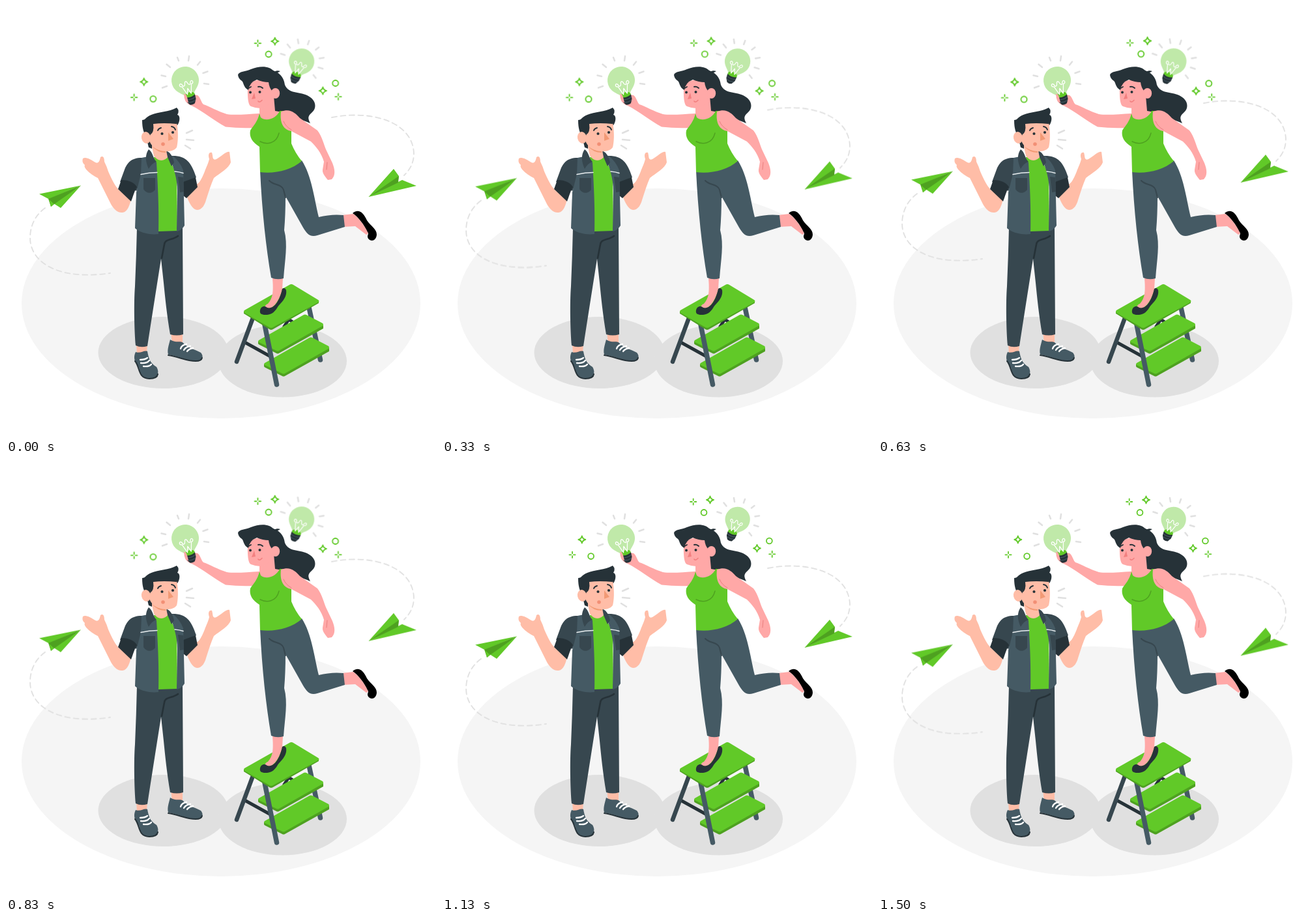
An HTML page that plays this animation: 660x660 px, repeating every 1540 ms.

```html
<!DOCTYPE html>
<html lang="en">
<head>
<meta charset="utf-8">
<title>Bright ideas</title>
<style>
  html, body { margin: 0; width: 100%; height: 100%; overflow: hidden; background: #fff; }
  svg { display: block; width: 100%; height: 100%; }
  .line { fill: none; stroke-linecap: round; stroke-linejoin: round; }
  .ray { stroke: #e0e0e0; stroke-width: 2.5; }
  .trail { stroke: #e0e0e0; stroke-width: 1.8; stroke-dasharray: 8 5.5; }
  .green { fill: #61c928; }
  .leaf { fill: #4ea120; }
  .ink { fill: #263238; }
  .navy { fill: #37474f; }
  .slate { fill: #455a64; }
  .rose { fill: #ffa8a7; }
  .peach { fill: #ffbda7; }
  .float { animation: float 1.54s linear -40ms infinite; }
  .beat { animation: beat 1.54s linear -40ms infinite; }
  #sparks { transform-origin: 355.5px 96.5px; }
  #idea { transform-origin: 455px 85px; }
  @keyframes float {
    0%, 100% { transform: translateY(1.4px); }
    49.35% { transform: translateY(-25px); }
  }
  @keyframes beat {
    0%, .5%, 29.5%, 40.3%, 58.5%, 100% { transform: scale(1); }
    10.4%, 49.4% { transform: scale(1.1); }
  }
</style>
</head>
<body>
<svg viewBox="0 0 660 660">
  <defs>
    <g id="bulb">
      <path fill="#c0e9a9" d="M-7 24C-9 18-21 14-21 0A21 21 0 0 1 21 0C21 14 9 18 7 24Z"/>
      <path class="green" d="M-8 23.500C-7 18 7 18 8 23.500L7.500 28H-7.500Z"/>
      <path class="line" stroke="#fff" stroke-width="1.300" d="M-3 22L-7.500 8C-12 8-11 2-8 3.500C-5 6-7 9-4 8C-1 7-3 2 0 2C3 2 1 7 4 8C7 9 5 6 8 3.500C11 2 12 8 7.500 8L3 22M-3 22L0 13L3 22"/>
      <path class="ink" d="M-8 25Q0 29 8 25L7.500 32L4 38Q0 40-4 38L-7.500 32Z"/>
      <path class="line" stroke="#455a64" stroke-width="1" d="M-7 29Q0 32 7 29M-6 33.500Q0 36 6 33.500"/>
    </g>
    <path id="plus" class="line" stroke="#61c928" stroke-width="1.800" d="M0-4.600V-1.900M0 1.900V4.600M-4.600 0H-1.900M1.900 0H4.600"/>
    <path id="star" class="line" stroke="#61c928" stroke-width="1.800" d="M0-5.500Q1-1 5.500 0Q1 1 0 5.500Q-1 1-5.500 0Q-1-1 0-5.500Z"/>
    <circle id="ring" class="line" stroke="#61c928" stroke-width="1.800" r="4.400"/>
    <g id="step">
      <path class="leaf" d="M0 0V3Q0 4 2 5L28 18Q30 19 32 18L100 -20V-25Z"/>
      <path class="green" d="M1 -2L70 -41Q72 -42 74 -41L99 -28Q101 -26 99 -24L32 14Q30 15 28 14L1 1Q-1 0 1 -2Z"/>
    </g>
  </defs>

  <ellipse cx="330" cy="456.500" rx="306" ry="176.500" fill="#f5f5f5"/>
  <g fill="#e0e0e0">
    <ellipse cx="241.500" cy="532" rx="100" ry="55"/>
    <ellipse cx="424.500" cy="545" rx="98.500" ry="55.500"/>
  </g>

  <g class="float">
    <path class="line trail" d="M60 310C46 320 37 336 37 356C37 392 78 422 160 410"/>
    <path class="green" d="M51 288.500L115 275.500L66 296.500ZM73 303L115 275.500L84 310Z"/>
    <path class="leaf" d="M65 296L115 275.500L74 304L69 308Z"/>
    <path class="green" d="M66 297L74 304L69 308Z"/>
    <path class="line trail" d="M500 171C562 159 624 178 626 226C626 240 621 250 611 260"/>
    <path class="green" d="M556.500 293L595 250L603 261L602 267ZM556.500 293L608 267L630 276Z"/>
    <path class="leaf" d="M556.500 293L603 261L602 271Z"/>
  </g>

  <g id="stool">
    <g class="line" stroke="#263238" stroke-width="5">
      <path d="M368 517L406 538M427 492L434 481L443 487"/>
    </g>
    <path class="line" stroke="#37474f" stroke-width="6.500" d="M380 476L354 546"/>
    <path class="line" stroke="#455a64" stroke-width="7.500" d="M464 458L482.500 543"/>
    <use href="#step" x="396" y="550"/>
    <use href="#step" x="387" y="515"/>
    <path class="line" stroke="#455a64" stroke-width="7.500" d="M396 484L415.500 581"/>
    <path class="leaf" d="M365 469V472L404 496Q407 498 410 496L480 456V452Z"/>
    <path class="green" d="M366 467L435 428Q438 426 441 428L479 451Q482 453 479 455L410 493Q407 495 404 493L366 471Q364 469 366 467Z"/>
  </g>

  <g id="woman">
    <path class="ink" d="M410 99C424 104 427 114 428 121C434 135 449 131 462 137C477 144 477 157 470 163C463 169 463 172 467 180C454 174 432 168 413 163L405 145Z"/>
    <path class="rose" d="M409 418H425L424 435C421 448 412 465 402 464C396 463 397 459 402 457C409 449 411 440 409 418Z"/>
    <path class="ink" d="M390 467C391 461 397 459 401 463C411 466 420 453 424 434Q428 431 430 436C432 449 420 457 417 462C411 472 406 474 398 474C392 474 389 472 390 467Z"/>
    <path class="rose" d="M516 321L533 319C542 325 551 338 556 349L553 351L536 338L518 339Z"/>
    <path d="M532 318C541 311 548 316 554 329C560 338 569 342 569 351C568 361 560 362 556 357C553 352 558 350 555 347C550 336 541 324 532 318Z"/>
    <path class="slate" d="M390 253C410 258 438 249 454 237C469 260 473 295 480 324Q500 319 518 321L520 339L478 352C466 356 461 348 456 340L429 292Q429 321 427 344C433 366 428 390 426 418Q416 421 407 417C399 370 393 315 390 253Z"/>
    <path class="line" stroke="#37474f" stroke-width="2" d="M404 268C410 275 423 273 426 282L429 294"/>
    <path class="rose" d="M389 165C370 166 352 168 339 166C326 162 312 154 303 151C299 147 299 141 294 137L274 134C272 142 276 150 285 153C303 162 318 175 337 185.500Q358 188 381 187Z"/>
    <path class="rose" d="M389 148L411 138L413 161L424 163L419 186H386L383 172L389 165Z"/>
    <path class="green" d="M389 165L391 171C399 178 415 173 420 161L428 161L430 183L438 189L438 211Q444 226 454 238C438 252 412 258 390 255L389 216C378 209 373 201 375 191C380 183 386 178 389 165Z"/>
    <path class="rose" d="M422 162C436 157 443 163 451 172L478 191C485 200 488 213 491 220L501 241C505 251 506 260 500 266L494 267C491 263 485 257 486 251L488 239C484 225 476 216 468 208L438 192C426 190 420 180 422 162Z"/>
    <path class="line" stroke="#4ea120" stroke-width="1.400" d="M390 208C400 213 415 212 419 195"/>
    <path class="line" stroke="#e87f7f" stroke-width="1" d="M426 177Q429 185 438 190M493 240L492 251"/>
    <path class="rose" d="M371 117L408 109L411 140C408 151 399 154 394 156Q386 158 376 154C370 151 371 132 371 117Z"/>
    <path class="ink" d="M356 106C357 100 368 101 376 97C389 92 404 91 412 101Q415 98 421 100L416 103C424 108 428 119 427 131L413 142L409 131Q404 126 403 117Q394 117 385 113Q374 117 372 129C364 125 365 117 362 115Q357 112 356 106Z"/>
    <ellipse class="rose" cx="413.500" cy="134" rx="6.700" ry="8"/>
    <path class="line" stroke="#263238" stroke-width="1.900" d="M371 127L376 124M387 124Q391 123 394 126"/>
    <g class="ink"><circle cx="375" cy="132.500" r="2"/><circle cx="389.500" cy="132" r="2"/></g>
    <path fill="#f28080" d="M381 133L377 143L383 142Z"/>
    <path class="line" stroke="#f28080" stroke-width="1.600" d="M387 146Q389 149 393 144.500"/>
  </g>

  <g id="man">
    <path class="peach" d="M200 518H217L216 534H201ZM253 500H271V519L255 518Z"/>
    <path class="slate" d="M199 531C207 534 211 528 217 530C219 541 221 548 231 554C237 564 231 572 221 572C210 572 205 565 204 555C197 547 195 539 199 531ZM252 512C261 518 267 513 272 517C277 524 290 527 299 532C305 539 300 546 291 545C276 544 263 537 249 535C247 528 250 520 252 512Z"/>
    <path class="line" stroke="#263238" stroke-width="2" d="M198 545C206 554 202 572 220 572Q232 572 233 565M249 536C264 538 277 545 291 545Q300 545 301 540"/>
    <path class="line" stroke="#fff" stroke-width="2.300" d="M206 543Q213 543 217 540M207 548Q216 549 220 544M211 553Q220 554 223 550M268 526Q270 520 277 519M273 528Q276 523 283 522M278 530Q281 526 287 525"/>
    <path class="navy" d="M201 340H271L272 504Q262 507 252 504C247 475 244 445 242 425L238 388Q225 470 217 522Q207 525 199 521C197 500 196 455 198 430Q200 385 201 340Z"/>
    <path class="line" stroke="#263238" stroke-width="2.600" d="M264 353C255 360 244 357 243 366L239 387"/>

    <path class="peach" d="M118 234C123 231 130 236 137 240C142 243 144 237 145 232C149 229 151 233 151 239Q155 247 157 254C163 268 168 277 174 283L192 296C190 305 187 316 179 317C171 318 165 311 161 304L141 264C131 259 118 249 121 244C117 241 117 237 118 234Z"/>
    <path class="peach" d="M277 291C281 302 286 312 293 313C301 313 305 305 307 298C311 285 315 273 319 264C329 256 342 249 345 240L343 224C339 222 330 231 323 235C316 238 318 230 316 225C311 224 310 229 312 235C310 243 307 248 305 254C300 266 297 272 292 274Z"/>
    <path class="navy" d="M208 233C192 233 186 241 182 251L175 270L200 284L212 260ZM253 230C276 229 284 239 292 263L273 274Z"/>
    <path class="ink" d="M177 267C189 267 197 271 201 278C196 286 195 293 192 300L172 281ZM272 270L291 263L294 278L277 295L272 291Z"/>
    <path class="green" d="M227 232H250L262 260L263 345L234 346Z"/>
    <path class="slate" d="M208 233L218 231L231 240C233 275 235 310 234 350C220 352 204 347 198 341L200 286L207 258ZM251 231L257 231Q267 239 272 252L274 337Q270 344 262 346L263 285C263 264 257 248 251 231Z"/>
    <path class="navy" d="M211 264H229V282C224 289 215 288 211 281ZM264 262L272 263L273 285L267 286Z"/>
    <path class="line" stroke="#e8edef" stroke-width="1.500" d="M207 258.500Q220 255.500 232 255.500M259 254Q266 254.500 272 256.500"/>
    <path class="peach" d="M222 208L227 230C234 240 244 238 249 231L246 219Z"/>
    <path class="navy" d="M219 220C214 227 213 237 219 250Q224 241 231 239C225 233 226 225 219 220ZM246 222Q255 226 258 240L254 246L248 232Z"/>
    <path fill="#f29a75" d="M224 215Q234 223 245 222V225Q232 225 224 215Z"/>
    <path class="ink" d="M209 175C215 175 213 171 223 167C234 162 250 163 262 156Q267 161 263 167C268 168 267 178 263 183L224 186L224 219L219 217L217 209L216 200Q209 194 209 175Z"/>
    <path class="peach" d="M225 179Q242 181 262 179C265 195 264 210 262 217C257 224 245 224 238 222C230 220 223 215 220 207L222 193Q226 186 225 179Z"/>
    <path class="ink" d="M223 177H264L262 181Q242 179 226 181Q228 194 221 198Z"/>
    <ellipse class="peach" cx="215" cy="202" rx="7" ry="9" transform="rotate(-12 215 202)"/>
    <path class="line" stroke="#263238" stroke-width="1.900" d="M233 191Q234 188 238 187M254 185Q259 186 260 190"/>
    <g class="ink"><circle cx="239.500" cy="196" r="2.100"/><circle cx="256" cy="194" r="2.100"/></g>
    <path fill="#f29a75" d="M249 194L249 207L257 204Z"/>
    <circle cx="241" cy="212" r="2.800" fill="#f28f75"/>
    <path class="line ray" stroke-width="2" d="M277 195L286 191M277 205L288 206M275 214L283 219"/>
  </g>

  <use href="#bulb" transform="translate(275 114) rotate(-17)"/>
  <path class="rose" d="M273 135Q276 134 278 140L280 148L276 147Z"/>
  <path class="line ray" d="M263 79L265 84M281 77L280 84M298 85.500L294 90.500M309.500 100.500L302.500 103M311 120L304 119M247 123L240 125.500M238.500 106.500L245 108M246.500 89.500L252 94"/>

  <g id="idea" class="beat">
    <use href="#bulb" transform="translate(453.700 84.800) rotate(21) scale(.91)"/>
    <path class="line ray" d="M432.500 59.500L436.500 64.500M448 52L449 58M465 54L463 59.500M479.500 64L475 67.500M487 79.500L480.500 80.500M485.500 96L479 94M475 110L471.500 105.500M422.500 73.500L428.500 75.500"/>
  </g>
  <g id="sparks" class="beat">
    <use href="#plus" x="200" y="139.300"/>
    <use href="#plus" x="385.700" y="58"/>
    <use href="#plus" x="506.700" y="138.300"/>
    <use href="#star" x="214.800" y="116"/>
    <use href="#star" x="411.500" y="55"/>
    <use href="#star" x="483.500" y="129.300"/>
    <use href="#ring" x="228.600" y="141.600"/>
    <use href="#ring" x="402" y="74.400"/>
    <use href="#ring" x="502.400" y="118"/>
  </g>
</svg>
</body>
</html>
```
